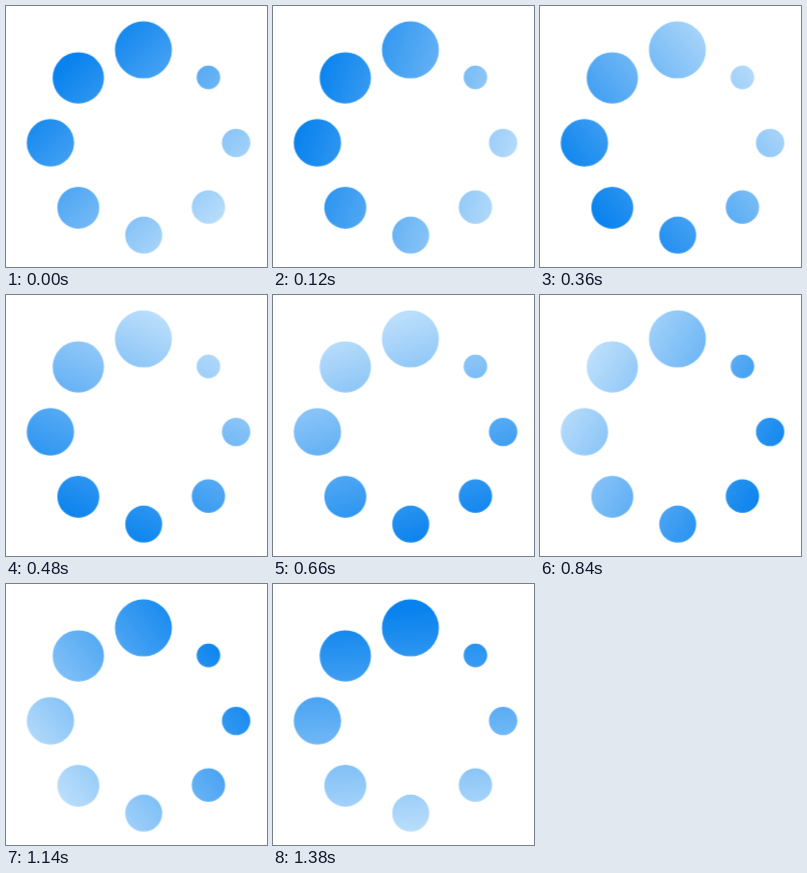
An HTML page without scripts that plays this animation: 261x261 px, repeating every 1.44 s.

```html
<!DOCTYPE html>
<html lang="en">
<head>
<meta charset="utf-8">
<title>Loading ring</title>
<style>
  html, body { margin: 0; width: 100%; height: 100%; overflow: hidden; background: #fff; }
  svg { display: block; width: 100vw; height: 100vh; }
  /* Only the shading turns; the dots stay put. */
  .shade { transform-origin: 0 0; animation: turn 1440ms steps(24) infinite; }
  @keyframes turn {
    from { transform: rotate(-45deg); }
    to { transform: rotate(-377.4deg); }
  }
</style>
</head>
<body>
<svg viewBox="0 0 261 261">
  <defs>
    <linearGradient id="blue" gradientUnits="userSpaceOnUse" x1="0" y1="-112" x2="0" y2="112">
      <stop offset="0" stop-color="#0882ee"/>
      <stop offset="1" stop-color="#bbdefb"/>
    </linearGradient>
    <clipPath id="dots">
      <circle cy="-92.9" r="28.5"/>
      <circle cx="-65.1" cy="-64.9" r="25.7"/>
      <circle cx="-93" r="23.7"/>
      <circle cx="-65.1" cy="64.9" r="21"/>
      <circle cx="0.3" cy="92.3" r="18.5"/>
      <circle cx="65" cy="64.3" r="16.7"/>
      <circle cx="92.7" cy="0.1" r="14.2"/>
      <circle cx="65" cy="-65.4" r="11.8"/>
    </clipPath>
  </defs>
  <g transform="translate(137.4 136.8)">
    <g clip-path="url(#dots)">
      <rect class="shade" x="-200" y="-200" width="400" height="400" fill="url(#blue)"/>
    </g>
  </g>
</svg>
</body>
</html>
```
